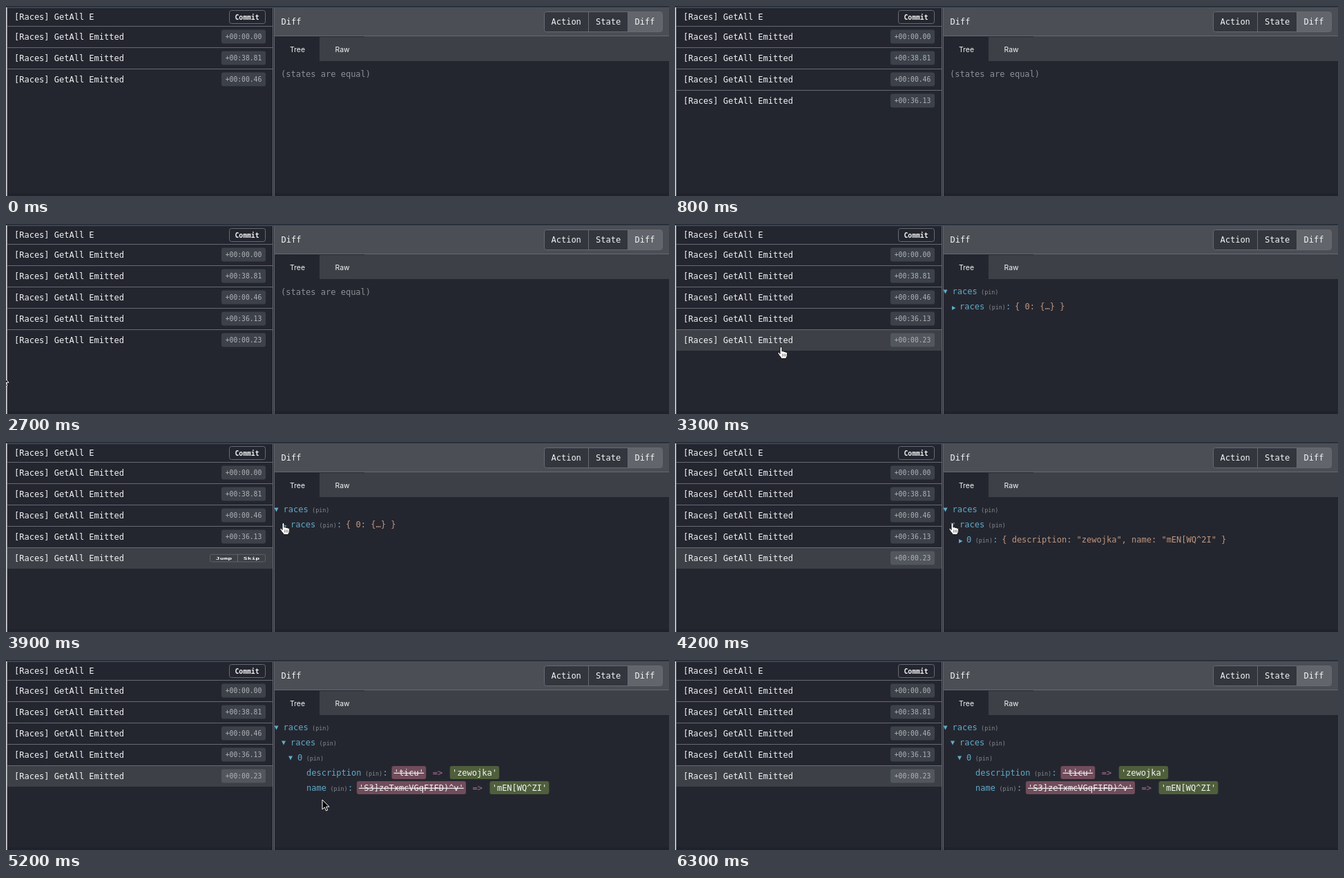
Recreate the animation shown at these times as an HTML page. Size 960 by 276 pixels, loop 6.4 s.

```html
<!DOCTYPE html>
<html lang="en">
<head>
<meta charset="utf-8">
<title>State inspector</title>
<style>
  html, body { margin: 0; width: 100%; height: 100%; overflow: hidden; background: #24262f; }
  svg { display: block; width: 960px; height: 276px; }
  text { font: 12px "DejaVu Sans Mono", monospace; fill: #f3f4f5; white-space: pre; }
  .small { font-size: 9.7px; text-anchor: middle; }
  .bold { font-weight: bold; }
  .stamp { fill: #b0b2b6; }
  .tab { font: 10.4px Inter, sans-serif; }
  .muted { fill: #8d8f95; }
  .pin { font-size: 8.4px; fill: #85888f; }
  .key { fill: #62abc9; }
  .value { fill: #c0967f; }
  .arrow { fill: #a56d8b; }
  .old { text-decoration: line-through; }
</style>
</head>
<body>
<svg id="stage" viewBox="0 0 960 276"></svg>
<script>
const LOOP = 6400, STEP = 100, CHAR = 7.224;
const BG = '#24262f', BAR = '#3d4147', LINE = '#676a72';
const STAMPS = ['+00:00.00', '+00:38.81', '+00:00.46', '+00:36.13', '+00:00.23'];

// time, x, y of the pointer tip
const PATH = [
  [2700, -6, 220], [2800, 58, 207], [2900, 116, 192], [3000, 149, 182], [3100, 159, 179],
  [3300, 154, 178.5], [3500, 156, 178], [3600, 176, 177], [3700, 248, 171], [3800, 346, 150],
  [3900, 402, 117.5], [4300, 402, 117.5], [4500, 413, 134], [4700, 419, 144.5], [4900, 419, 144.5],
  [5100, 433, 168], [5200, 458, 203], [5300, 482, 246], [5400, 503, 267]
];
const HAND = 'M-2 1.5a1.5 1.5 0 0 1 3 0V6.5q1.8-1 2.6.5 1.8-.8 2.5.7 2.2-.5 2.4 1.3V12q0 2-1.5 3.5V17H-.5V15.5' +
  'Q-2.5 13.5-4.8 9.8c-.8-1.6 1-2.4 2.2-1L-2 10Z';
const ARROW = 'M0 0V14l3.3-3 2.2 5 2.2-1-2.1-4.8H10Z';

const rect = (x, y, w, h, fill, more = '') =>
  `<rect x="${x}" y="${y}" width="${w}" height="${h}" fill="${fill}" ${more}/>`;
const text = (x, y, s, cls = '') =>
  `<text x="${x}" y="${y}" class="${cls}">${s.replace(/>/g, '&gt;')}</text>`;
const path = (d, fill, more = '') => `<path d="${d}" fill="${fill}" ${more}/>`;
const outline = (x, y, w, h, fill = 'none') =>
  rect(x + .5, y + .5, w - 1, h - 1, fill, `rx="3" stroke="${LINE}"`);
const flip = (y, k, content) =>
  `<g transform="translate(0 ${y}) scale(1 ${k}) translate(0 ${-y})">${content}</g>`;

function frameArt() {
  return rect(0, 0, 960, 276, BG) + rect(0, 272, 960, 4, '#20222b') +
    rect(0, 0, 960, 2, '#28313b') + rect(0, 2, 960, 1, '#4b535d') +
    rect(0, 2, 1.6, 274, '#d5d7da') +
    text(12, 20, '[Races] GetAll E') + outline(323, 6, 53, 20) + text(349, 19.5, 'Commit', 'small bold') +
    rect(386, 3, 1, 273, LINE) + rect(388, 3, 1, 273, LINE) +
    rect(389, 3, 571, 40, '#4b4e54') + rect(389, 43, 571, 1, '#666970') + rect(389, 44, 571, 36, BAR) +
    rect(389, 44, 65, 36, BG) + rect(454, 44, 65, 1, '#25272e') +
    text(398.5, 27, 'Diff') +
    outline(779, 8, 172, 30, '#33363d') + rect(900, 9, 50, 28, '#62656b') +
    rect(843, 8, 1, 30, LINE) + rect(900, 8, 1, 30, LINE) +
    text(789.5, 27, 'Action') + text(854, 27, 'State') + text(910.5, 27, 'Diff') +
    text(411, 67, 'Tree', 'tab') + text(476.5, 67, 'Raw', 'tab');
}

function badge(y, stamp, active) {
  return rect(312, y - 10, 64, 20, active ? '#52565d' : '#3d424a', 'rx="3"') +
    text(344, y + 3.6, stamp, 'small stamp');
}

function rowButtons(y) {
  return outline(295, y - 10, 81, 20) + rect(335, y - 10, 1, 20, LINE) +
    text(315.5, y + 3.5, 'Jump', 'small bold') + text(355.5, y + 3.5, 'Skip', 'small bold');
}

function rows(t) {
  const count = t < 800 ? 3 : t < 1600 ? 4 : 5;
  return STAMPS.slice(0, count).map((stamp, i) => {
    const top = 29 + 31 * i, mid = top + 15.4;
    const active = i === 4 && t >= 3300;
    const hover = active && t >= 3400 && t < 4000;
    const edge = t === 3400 || t === 3900;
    return (active ? rect(2, top + 1, 384, 30, BAR) : '') + rect(2, top, 384, 1, LINE) +
      text(12, top + 20, '[Races] GetAll Emitted') +
      (hover ? flip(mid + .5, edge ? .56 : 1, rowButtons(mid)) : badge(mid, stamp, active));
  }).join('');
}

// A tree label with its pin; end is where a value would start.
function node(x, y, name, open, colon) {
  const pinX = x + name.length * CHAR + 5.5, end = pinX + 25.5;
  const mark = open === null ? '' : open
    ? path(`M${x - 13} ${y - 6.5}h6l-3 6Z`, '#62abc9')
    : path(`M${x - 11} ${y - 5}v6l5.5-3Z`, '#62abc9');
  return {
    end: end + 13,
    art: mark + text(x, y, name, 'key') + text(pinX, y, '(pin)', 'pin') + (colon ? text(end, y, ':', 'key') : '')
  };
}

function chip(x, y, s, fill, cls) {
  return rect(x, y - 14, s.length * CHAR + 6.4, 19, fill, 'rx="3"') + text(x + 3.2, y, s, cls);
}

function change(y, name, before, after) {
  const label = node(435, y, name, null, true);
  const x = label.end, next = x + before.length * CHAR + 6.4 + 9.5;
  return label.art + chip(x, y, before, '#714c5a', 'old') + text(next, y, '=>', 'arrow') +
    chip(next + 25, y, after, '#4f5f3b');
}

function valueNode(x, y, name, value) {
  const label = node(x, y, name, false, true);
  return label.art + text(label.end, y, value, 'value');
}

function tree(t) {
  if (t < 3300) return text(398, 103, '(states are equal)', 'muted');
  const root = node(401.5, 102, 'races', true).art;
  if (t < 4200) return root + valueNode(412, 124, 'races', '{ 0: {…} }');
  const list = root + node(412, 124, 'races', true).art;
  if (t < 4900) return list + valueNode(422, 146, '0', '{ description: "zewojka", name: "mEN[WQ^2I" }');
  return list + node(422, 146, '0', true).art +
    change(168, 'description', "'ticu'", "'zewojka'") +
    change(190, 'name', "'S3]zeTxmcVGqFIFD)^v'", "'mEN[WQ^ZI'");
}

function pointer(t) {
  if (t < 2700 || t > 5400) return '';
  const i = Math.max(1, PATH.findIndex(p => p[0] >= t));
  const [t0, x0, y0] = PATH[i - 1], [t1, x1, y1] = PATH[i];
  const k = (t - t0) / (t1 - t0);
  const at = `transform="translate(${x0 + (x1 - x0) * k} ${y0 + (y1 - y0) * k})"`;
  return t >= 3000 && t < 5200
    ? path(HAND, '#fff', `stroke="#111" ${at}`) +
      path('M1.7 10v4M4 10v4M6.2 10v4', 'none', `stroke="#333" stroke-width=".7" ${at}`)
    : path(ARROW, '#000', `stroke="#fff" ${at}`);
}

const stage = document.getElementById('stage');
const base = frameArt();
const start = performance.now();
let shown = -1;

function tick() {
  const t = Math.floor((performance.now() - start) % LOOP / STEP) * STEP;
  if (t !== shown) {
    shown = t;
    stage.innerHTML = base + rows(t) + tree(t) + pointer(t);
  }
  requestAnimationFrame(tick);
}
tick();
</script>
</body>
</html>
```
